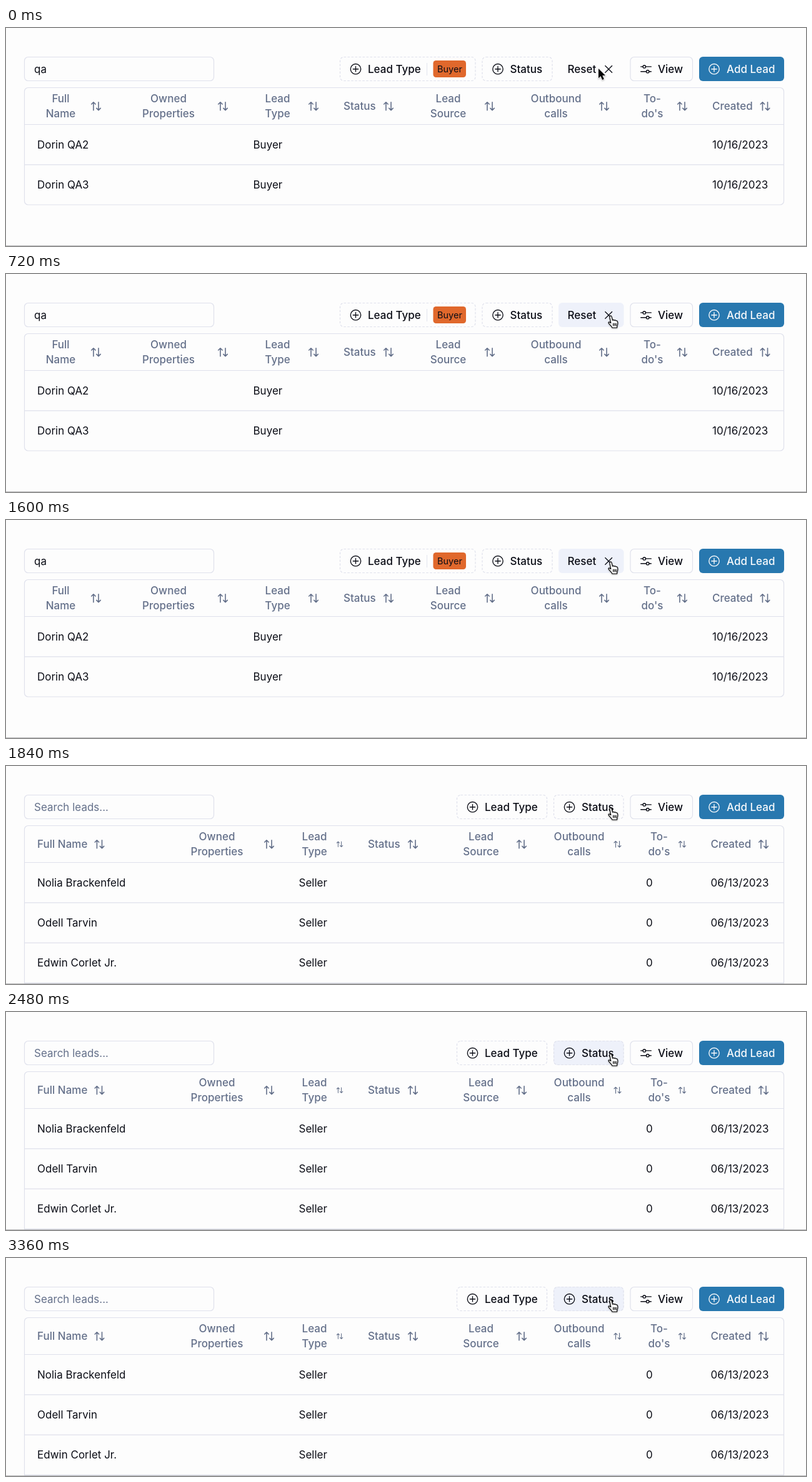
Recreate the animation shown at these times as an HTML page. Size 1280 px wide and 349 px high, loop 3.52 s.

```html
<!DOCTYPE html>
<html lang="en">
<head>
<meta charset="utf-8">
<title>Leads table</title>
<style>
  html, body { margin: 0; width: 100%; height: 100%; overflow: hidden; background: #fdfdfd; }
  svg { display: block; width: 1280px; height: 349px; }
  text { font: 400 17px Inter, sans-serif; fill: #0b0d16; white-space: pre; }
  .medium { font-weight: 500; }
  .muted { fill: #64708a; }
  .light { fill: #f8fafc; }
  .small { font-size: 14.5px; }
  .box { fill: none; stroke: #dfe1ec; stroke-width: 1.2; }
  .dashed { stroke-dasharray: 3.6 2.4; }
  .icon { fill: none; stroke: #0b0d16; stroke-width: 1.35; stroke-linecap: round; stroke-linejoin: round; }
  .sort { fill: none; stroke: #64708a; stroke-width: 2; stroke-linecap: round; stroke-linejoin: round; }
</style>
</head>
<body>
<svg id="stage" viewBox="0 0 1280 349"></svg>
<script>
const LOOP = 3520, STEP = 80, RESET_AT = 1840;

const text = (x, y, label, cls = '', anchor = 'start') =>
  `<text x="${x}" y="${y}" class="${cls}" text-anchor="${anchor}">${label}</text>`;
const box = (x, y, w, h, cls = '') =>
  `<rect x="${x}" y="${y}" width="${w}" height="${h}" rx="6" class="box ${cls}"/>`;
const line = (x1, y1, x2, y2, color = '#dfe1ec') =>
  `<path d="M${x1} ${y1}L${x2} ${y2}" stroke="${color}" stroke-width="1.2"/>`;
const hover = (id, x, w) =>
  `<rect id="${id}" x="${x}" y="46" width="${w}" height="39" rx="6" fill="#eef1fa"/>`;

const plusIcon = (x, color = '#0b0d16') =>
  `<g class="icon" transform="translate(${x} 65.7)" style="stroke:${color}">
    <circle r="8.2"/><path d="M-4.2 0H4.2M0-4.2V4.2"/></g>`;

const sortIcon = (x, size = 19.4) =>
  `<path class="sort" d="m21 16-4 4-4-4M17 20V4M3 8l4-4 4 4M7 4v16"
    transform="translate(${x} 125.2) scale(${size / 24}) translate(-12 -12)"/>`;

// Button with a dashed outline, a plus icon and a label
const filter = (x, w, label) =>
  box(x, 46.5, w, 38, 'dashed') + plusIcon(x + 25) + text(x + 44.5, 71.8, label, 'medium');

// Column: [label, x, sort icon x, sort icon size]; "|" splits a label into two centred lines
const header = ([label, x, iconX, size]) => {
  const lines = label.split('|');
  const labels = lines.length > 1
    ? lines.map((s, i) => text(x, 119 + 24.2 * i, s, 'medium muted', 'middle')).join('')
    : text(x, 131, label, 'medium muted');
  return labels + sortIcon(iconX, size);
};

const table = (columns, rows, cellX, height) =>
  box(29.5, 95.5, 1215, height) + columns.map(header).join('') +
  rows.map((cells, i) => {
    const y = 154.5 + 64.3 * i;
    return line(30, y, 1244, y) +
      cells.map((cell, j) => text(cellX[j], y + 38, cell)).join('');
  }).join('');

const filtered = text(45, 71.8, 'qa') +
  filter(534.5, 216.5, 'Lead Type') + line(673.5, 56, 673.5, 76, '#e6e8f0') +
  '<rect x="683.5" y="52" width="52.5" height="27" rx="4.5" fill="#e0682c"/>' +
  text(690, 70.8, 'Buyer', 'small') +
  filter(762, 112, 'Status') +
  hover('resetHover', 884, 104.5) + text(898.5, 71.8, 'Reset', 'medium') +
  '<path class="icon" d="M958.8 60.5l10.8 10.8m0-10.8l-10.8 10.8"/>' +
  table([
    ['Full|Name', 87.5, 144], ['Owned|Properties', 260, 347], ['Lead|Type', 434.5, 492],
    ['Status', 540, 612], ['Lead|Source', 707.5, 774], ['Outbound|calls', 880, 957],
    ["To-|do's", 1034, 1082], ['Created', 1130, 1214.5]
  ], [
    ['Dorin QA2', 'Buyer', '10/16/2023'],
    ['Dorin QA3', 'Buyer', '10/16/2023']
  ], [50, 395.5, 1130], 187.5);

const unfiltered = text(45, 71.8, 'Search leads...', 'muted') +
  filter(721.5, 144, 'Lead Type') +
  hover('statusHover', 876, 112.5) + filter(876.5, 111.5, 'Status') +
  table([
    ['Full Name', 50, 149.5], ['Owned|Properties', 337.5, 421], ['Lead|Type', 493.5, 534, 12.5],
    ['Status', 579, 651], ['Lead|Source', 760, 825], ['Outbound|calls', 917, 978.5, 14.5],
    ["To-|do's", 1045, 1082, 14.5], ['Created', 1127.5, 1212]
  ], [
    ['Nolia Brackenfeld', 'Seller', '0', '06/13/2023'],
    ['Odell Tarvin', 'Seller', '0', '06/13/2023'],
    ['Edwin Corlet Jr.', 'Seller', '0', '06/13/2023'],
    []
  ], [50, 468.5, 1024, 1127.5], 300);

const shared = box(29.5, 46.5, 303, 38) + box(999, 46.5, 99.5, 38) +
  `<g class="icon" transform="translate(1024 65.8)">
    <path d="M-8.3-3.9h3.3m4.4 0h8.9M-8.3 3.9h8.9m4.4 0h3.3"/>
    <circle cx="-2.7" cy="-3.9" r="2.2"/><circle cx="2.7" cy="3.9" r="2.2"/></g>` +
  text(1043, 71.8, 'View', 'medium') +
  '<rect x="1109" y="46" width="136" height="39" rx="6" fill="#2878af"/>' +
  plusIcon(1133, '#f8fafc') + text(1153, 71.8, 'Add Lead', 'medium light');

const cursors = `
  <g style="filter:drop-shadow(0 1px 1px #0005)">
    <path id="arrow" d="M948 65v15.2l3.5-3.2 2.6 6 2.7-1.2-2.6-5.8h4.8z"
      fill="#000" stroke="#fff" stroke-width="1.3" paint-order="stroke"/>
    <g id="hand" stroke="#000" stroke-width="1.2" stroke-linejoin="round" stroke-linecap="round">
      <path fill="#fff" d="M4.8 12.6L2.9 3.2Q2.6 1.2 4.1 .9 5.6 .7 6.1 2.6L7.4 8.2
        Q9 6.6 10.2 8.3 11.9 7.2 13 9 15 8.3 15.6 10.6 16.3 14 14.8 17L14.6 20H7
        Q5.8 17.6 2.6 14.4 .4 12.2 1.3 11.1 2.5 10.2 4.8 12.6Z"/>
      <path d="M8.6 13v3.7M10.9 13v3.7M13.1 13v3.7"/>
    </g>
  </g>`;

const stage = document.getElementById('stage');
stage.innerHTML = shared + `<g id="filtered">${filtered}</g><g id="unfiltered">${unfiltered}</g>` +
  line(0, 348.5, 1280, 348.5, '#b9b9bb') + cursors;

const part = id => document.getElementById(id);
const show = (id, on) => part(id).setAttribute('visibility', on ? 'visible' : 'hidden');
const progress = (t, from, to) => Math.min(1, Math.max(0, (t - from) / (to - from)));

function draw(now) {
  const t = Math.floor(now % LOOP / STEP) * STEP;
  const isReset = t >= RESET_AT;
  show('filtered', !isReset);
  show('unfiltered', isReset);
  show('arrow', t < STEP);
  show('hand', t >= STEP);

  const glide = 1 - (1 - progress(t, 0, 320)) ** 2;
  part('hand').setAttribute('transform', `translate(${945 + 18 * glide} ${65 + glide})`);
  part('resetHover').setAttribute('opacity', progress(t, 40, 240));
  part('statusHover').setAttribute('opacity', progress(t, RESET_AT + 40, RESET_AT + 240));
  requestAnimationFrame(draw);
}
requestAnimationFrame(draw);
</script>
</body>
</html>
```
